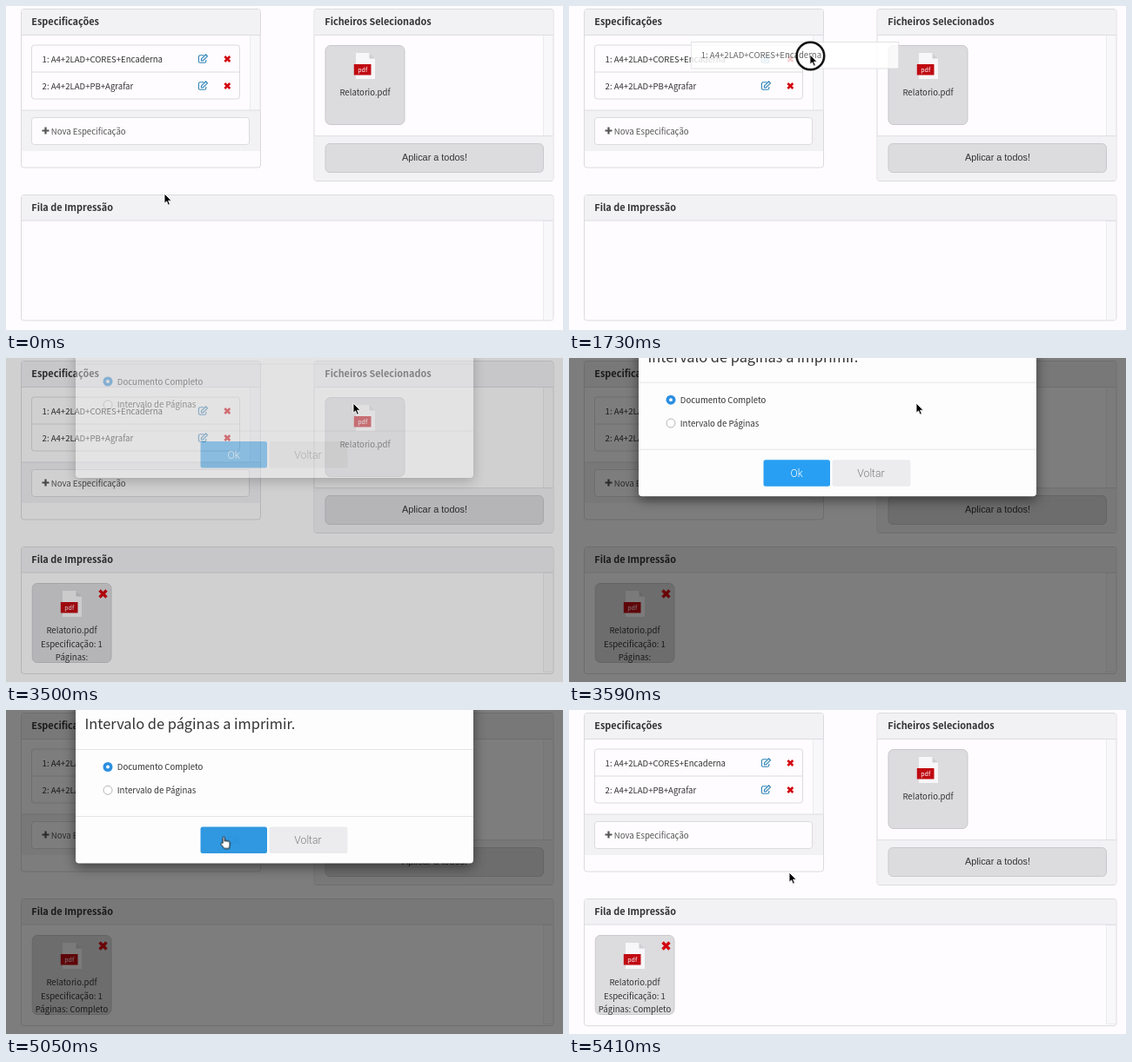
Recreate the animation shown at these times as an HTML page. Size 640 by 373 pixels, loop 5.46 s.

```html
<!DOCTYPE html>
<html lang="pt">
<head>
<meta charset="utf-8">
<title>Fila de Impressão</title>
<style>
  html, body { margin: 0; width: 100%; height: 100%; overflow: hidden; background: #fefcfe; }
  svg { display: block; width: 100vw; height: 100vh; }
  text { font: 9.58px 'Noto Sans CJK JP', 'Noto Sans CJK SC', 'Noto Sans', sans-serif; fill: #333; }
  .title { font-size: 10.86px; font-weight: 700; }
  .heading { font-size: 16.4px; }
  .mid { text-anchor: middle; }
  .arial { font: 10.88px 'Liberation Sans', Arial, sans-serif; text-anchor: middle; }
  .thin { font: 300 12.2px Roboto, 'Liberation Sans', sans-serif; text-anchor: middle; }
  .box { fill: #fefcfe; stroke: #dbdadd; }
  .bar { fill: #f2f1f4; }
  .track { fill: #f8f7f9; stroke: #ebeaed; }
  .line { stroke: #dddce0; fill: none; }
  .card { fill: #dcdbde; stroke: #c9c8cc; }

  /* Every track shares one 5460 ms clock. */
  .a { animation: 5460ms linear infinite; }
  .hard { animation-timing-function: step-end; }

  #pointer { animation-name: pointer; }
  @keyframes pointer {
    0%, .7% { transform: translate(182px, 216px); animation-timing-function: ease-in-out; }
    10.81%, 28.37% { transform: translate(157px, 59.5px); }
    28.39% { transform: translate(195px, 58px); }
    31.68% { transform: translate(276px, 56px); animation-timing-function: cubic-bezier(.2, .5, .6, 1); }
    38.28% { transform: translate(374px, 53px); animation-timing-function: ease-out; }
    43.96%, 69.2% { transform: translate(399px, 52px); animation-timing-function: ease-in-out; }
    82.8%, 92.6% { transform: translate(250px, 147px); animation-timing-function: ease-in-out; }
    98.9%, 100% { transform: translate(253px, 187px); }
  }
  #arrow { animation-name: arrow; }
  @keyframes arrow { 0%, 95.2% { opacity: 1; } 80.9% { opacity: 0; } 100% { opacity: 1; } }
  #hand { animation-name: hand; }
  @keyframes hand { 0%, 95.2%, 100% { opacity: 0; } 80.9% { opacity: 1; } }

  #ring { animation-name: ring; }
  @keyframes ring {
    0%, 21.6% { r: 16.8px; opacity: 0; }
    21.61%, 28.4% { r: 16.8px; opacity: 1; }
    31.68%, 34.8% { r: 15.8px; opacity: 1; }
    38.28%, 52.5% { r: 28px; opacity: 1; }
    52.56%, 100% { r: 28px; opacity: 0; }
  }

  #ghost { animation-name: ghost; }
  @keyframes ghost {
    0%, 28.38% { transform: translate(65px, 43px); opacity: 0; }
    28.39% { transform: translate(65px, 43px); opacity: 1; }
    31.68% { transform: translate(138.8px, 41px); opacity: 1; animation-timing-function: cubic-bezier(.2, .5, .6, 1); }
    38.28% { transform: translate(246px, 39px); opacity: 1; animation-timing-function: ease-out; }
    43.96%, 52.5% { transform: translate(271.5px, 38px); opacity: 1; }
    52.56%, 100% { transform: translate(271.5px, 38px); opacity: 0; }
  }

  .over { animation-name: over; }
  @keyframes over { 0%, 52.56%, 100% { opacity: 0; } 36.9% { opacity: 1; } }
  #pushed { animation-name: pushed; }
  @keyframes pushed { 0%, 52.56%, 100% { transform: none; } 36.9% { transform: translateY(32px); } }

  #queued { animation-name: queued; }
  @keyframes queued { 0% { opacity: 0; } 53.48%, 100% { opacity: 1; } }
  #queue { animation-name: queue; }
  @keyframes queue { 0% { height: 144.5px; } 53.48%, 100% { height: 146px; } }
  #done { animation-name: done; }
  @keyframes done { 0% { opacity: 0; } 92.49%, 100% { opacity: 1; } }
  #pending { animation-name: pending; }
  @keyframes pending { 0% { opacity: 1; } 92.49%, 100% { opacity: 0; } }

  #shade { animation-name: shade; }
  @keyframes shade {
    0%, 63.22% { opacity: 0; }
    65.75%, 93.04% { opacity: .5; }
    95.79%, 100% { opacity: 0; }
  }
  #fade { animation-name: fade; }
  @keyframes fade {
    0%, 63.22% { opacity: 0; }
    65.35%, 93.04% { opacity: 1; }
    95.79%, 100% { opacity: 0; }
  }
  #dialog { animation-name: slide; filter: drop-shadow(0 4px 7px rgba(0, 0, 0, .5)); }
  @keyframes slide {
    0%, 63.32% { transform: translateY(-51px); animation-timing-function: ease-out; }
    68.44%, 93.04% { transform: none; animation-timing-function: ease-out; }
    98.53%, 100% { transform: translateY(-51px); }
  }
  #ok { fill: #289ff2; animation-name: hover; }
  @keyframes hover { 0%, 81% { fill: #289ff2; } 82.4%, 100% { fill: #2f98e0; } }
  #okText { animation-name: press; }
  @keyframes press { 0% { fill: #fff; } 92.49%, 100% { fill: #2a8fd5; } }
</style>
</head>
<body>
<svg viewBox="0 0 640 373">
  <defs>
    <g id="edit" fill="none" stroke="#2f83b7" stroke-width="1.1">
      <path d="M1.5 -4.2H-3a1.6 1.6 0 0 0 -1.6 1.6V2.7a1.6 1.6 0 0 0 1.6 1.6H2.2a1.6 1.6 0 0 0 1.6 -1.6V1"/>
      <path d="M-1.6 2V-.1L3.6 -5.2L5.5 -3.2L.4 2Z" fill="#e4f0f7"/>
    </g>
    <path id="cross" d="M-3 -3L3 3M3 -3L-3 3" stroke="#d3070f" stroke-width="2.6"/>
    <g id="file">
      <path d="M35.5 9H51L57.5 15.5V39H35.5Z" fill="#f7f6f8"/>
      <path d="M51 9V15.5H57.5Z" fill="#cfced2"/>
      <rect x="33.3" y="22" width="19.7" height="12.5" fill="#c00a12"/>
      <text x="43.2" y="30.6" class="mid" style="font-size:7px;fill:#fff">pdf</text>
      <text x="46" y="58" class="mid">Relatorio.pdf</text>
    </g>
    <clipPath id="cardClip"><rect width="92" height="92" rx="6"/></clipPath>
  </defs>

  <!-- Specifications -->
  <rect class="box" x="17.5" y="3.5" width="275" height="182.5" rx="3"/>
  <path class="bar" d="M18 33V6q0-2 2-2H290q2 0 2 2V33Z"/>
  <rect class="track" x="280.5" y="33.5" width="11.5" height="87"/>
  <rect class="bar" x="18" y="120" width="274" height="47"/>
  <path class="line" d="M18 33.5H292M18 120H292"/>
  <text class="title" x="29.3" y="22">Especificações</text>
  <rect class="box" x="29.5" y="45" width="239" height="62" rx="3"/>
  <path class="line" d="M30 76H268"/>
  <text x="41.6" y="64.5">1: A4+2LAD+CORES+Encaderna</text>
  <text x="41.6" y="95.5">2: A4+2LAD+PB+Agrafar</text>
  <use href="#edit" x="226" y="61"/><use href="#cross" x="254.3" y="61"/>
  <use href="#edit" x="226" y="92"/><use href="#cross" x="254.3" y="92"/>
  <rect class="box" x="29.5" y="128.5" width="250" height="31" rx="3"/>
  <path d="M41.5 143.5H49.5M45.5 139.5V147.5" stroke="#555" stroke-width="2.2"/>
  <text x="51.8" y="147.7" style="fill:#555">Nova Especificação</text>

  <!-- Selected files -->
  <rect class="box" x="354" y="3.5" width="275" height="198" rx="3"/>
  <path class="bar" d="M354.5 33V6q0-2 2-2H626.5q2 0 2 2V33Z"/>
  <rect class="track" x="617.5" y="33.5" width="11" height="116"/>
  <rect class="bar" x="354.5" y="150" width="274" height="51"/>
  <path class="line" d="M354.5 33.5H628.5M354.5 149.7H628.5"/>
  <text class="title" x="366.3" y="22">Ficheiros Selecionados</text>
  <g transform="translate(366.5 45)">
    <rect class="card" x=".5" y=".5" width="91" height="91" rx="6"/>
    <g clip-path="url(#cardClip)">
      <g id="pushed" class="a hard"><use href="#file"/></g>
      <rect class="a hard over" width="92" height="33" fill="#3ade35" opacity="0"/>
    </g>
  </g>
  <rect class="card" x="367" y="158.5" width="250.5" height="33" rx="5"/>
  <text class="arial" x="492.5" y="178">Aplicar a todos!</text>

  <!-- Print queue -->
  <rect id="queue" class="a hard box" x="17.5" y="217.5" width="611.5" height="144.5" rx="3"/>
  <path class="bar" d="M18 247V220q0-2 2-2H626.5q2 0 2 2V247Z"/>
  <rect class="track" x="617.5" y="247.5" width="11" height="114"/>
  <path class="line" d="M18 247H628.5"/>
  <text class="title" x="29.3" y="236">Fila de Impressão</text>
  <g id="queued" class="a hard" opacity="0">
    <g transform="translate(29.5 259)">
      <rect class="card" x=".5" y=".5" width="91" height="91" rx="6"/>
      <use href="#file"/>
      <use href="#cross" transform="translate(82 12.5) scale(1.32)"/>
      <text class="mid" x="46" y="73.5">Especificação: 1</text>
      <text id="pending" class="a hard mid" x="46" y="89">Páginas:</text>
      <text id="done" class="a hard mid" x="46" y="89">Páginas: Completo</text>
    </g>
  </g>

  <!-- Dragged row -->
  <g id="ghost" class="a" opacity="0">
    <rect x=".5" y=".5" width="238.5" height="30.5" fill="#fff" fill-opacity=".82" stroke="#d5d4d8" stroke-opacity=".7"/>
    <text x="12" y="19.5" style="fill:#666">1: A4+2LAD+CORES+Encaderna</text>
  </g>

  <!-- Dialog -->
  <rect id="shade" class="a" width="640" height="373" opacity="0"/>
  <g id="fade" class="a" opacity="0">
    <g id="dialog" class="a">
      <rect x="80" y="-30" width="457" height="206.5" rx="4" fill="#fefdfe"/>
      <path d="M80 45.5H537M80 122.5H537" stroke="#e4e3e6"/>
      <text class="heading" x="90.5" y="22">Intervalo de páginas a imprimir.</text>
      <circle cx="117" cy="65.5" r="5.5" fill="#2b8fe0"/>
      <circle cx="117" cy="65.5" r="1.9" fill="#fff"/>
      <circle cx="117" cy="92.3" r="5" fill="#fff" stroke="#b5b4b8"/>
      <text x="127.8" y="69">Documento Completo</text>
      <text x="127.8" y="95.8">Intervalo de Páginas</text>
      <rect id="ok" class="a" x="223.5" y="134.5" width="76.5" height="30.5" rx="2.5"/>
      <text id="okText" class="a hard thin" x="261.7" y="154.3">Ok</text>
      <rect x="302.5" y="134.5" width="90" height="30.5" rx="2.5" fill="#ecebed"/>
      <text class="thin" x="347" y="154.3" style="fill:#7d7c7f">Voltar</text>
    </g>
  </g>

  <!-- Pointer -->
  <g id="pointer" class="a">
    <circle id="ring" class="a" cx=".5" cy="1.5" r="16.8" fill="none" stroke="#0a0a0a" stroke-width="2.5" opacity="0"/>
    <g class="a hard over" opacity="0">
      <circle cx="7" cy="18" r="6.5" fill="#359a31"/>
      <path d="M3.5 18H10.5M7 14.5V21.5" stroke="#fff" stroke-width="1.9"/>
    </g>
    <path id="arrow" class="a hard" d="M0 0V11.3L2.6 8.9L4.4 13.2L6.4 12.3L4.6 8.2H8.2Z" fill="#000" stroke="#fff" stroke-width=".9"/>
    <path id="hand" class="a hard" transform="translate(-3.5 -1.5)" opacity="0" fill="#fff" stroke="#111" stroke-linejoin="round"
      d="M2.6 8V1.6a1.1 1.1 0 0 1 2.2 0V5.6a1 1 0 0 1 2 .2a1 1 0 0 1 2 .4a1 1 0 0 1 1.9 .5V10L9.8 14H4.4L.6 9.2a1.1 1.1 0 0 1 2-1.2Z"/>
  </g>
</svg>
</body>
</html>
```
